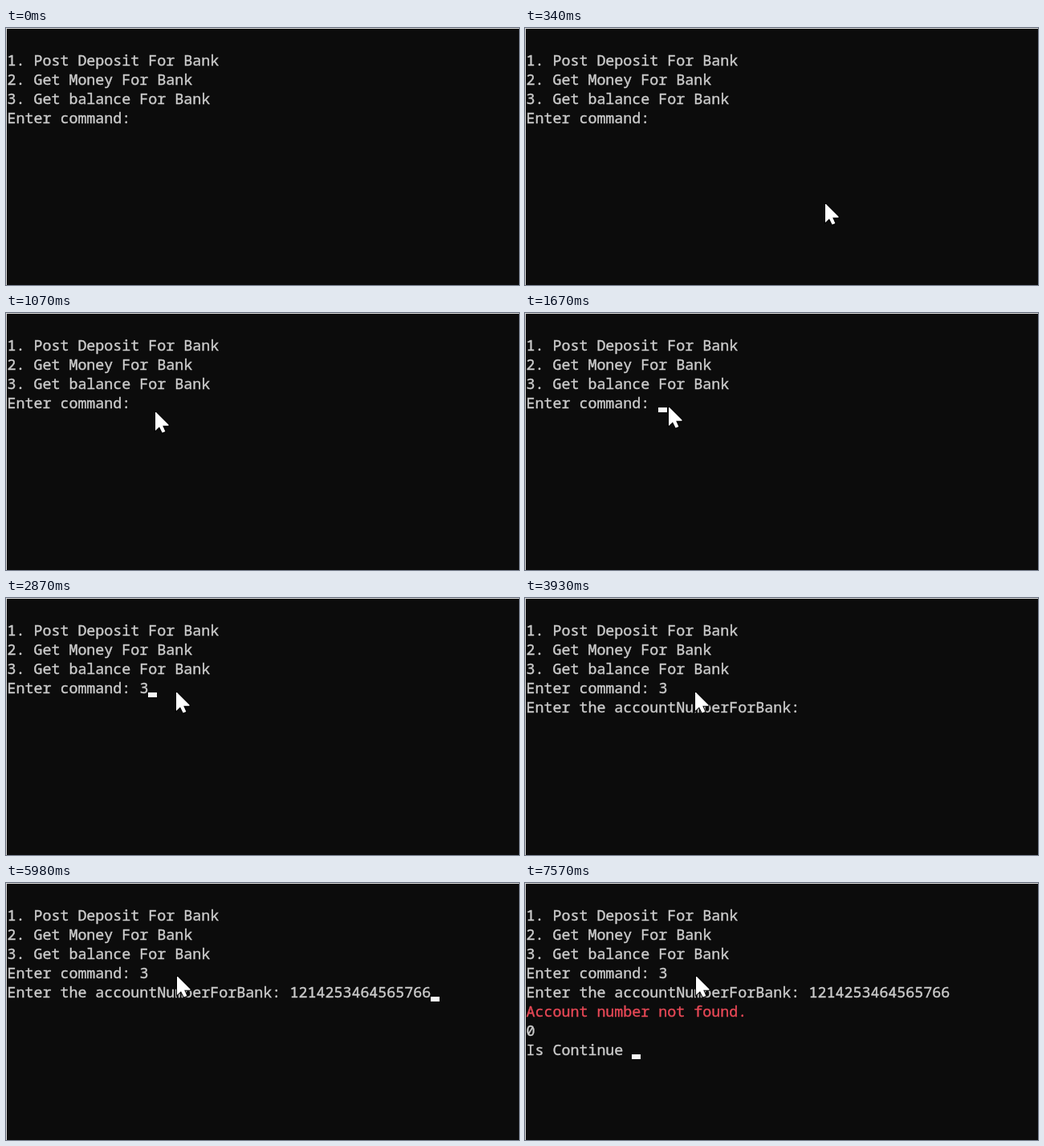
An HTML page with a canvas that plays this animation: 639 px wide and 321 px high, repeating every 8000 ms.

```html
<!DOCTYPE html>
<html lang="en">
<head>
<meta charset="utf-8">
<title>Bank console</title>
<style>
  html, body { margin: 0; width: 100%; height: 100%; overflow: hidden; background: #0c0c0c; }
  canvas { display: block; }
</style>
</head>
<body>
<canvas id="stage" width="639" height="321"></canvas>
<script>
const stage = document.getElementById('stage');
const ctx = stage.getContext('2d');
const LOOP = 8000, TICK = 66.9, BLINK = 530;
const CELL = 11, ROW = 24, LEFT = 1, TOP = 4;
const GREY = '#cccccc', RED = '#e74856';

// Console output; the caret follows the last print, appears at show
// and blinks from hide onwards.
const prints = [
  { at: 0, show: 1270, hide: 1800, text: `
1. Post Deposit For Bank
2. Get Money For Bank
3. Get balance For Bank
Enter command: ` },
  { at: 2200, show: 2200, hide: 2340, text: '3' },
  { at: 2930, show: 3010, hide: 3930, text: '\nEnter the accountNumberForBank: ' },
  { at: 5320, show: 5320, hide: 5450, text: '1214253464565766' },
  { at: 6440, show: 6510, hide: 7040, text: '\nAccount number not found.', colour: RED },
  { at: 6440, show: 6510, hide: 7040, text: '\n0\nIs Continue ' }
];

// Pointer moves, each starting where the one before ended.
const entry = { x: 522, y: 304 };
const moves = [
  { from: 67, to: 672, x: 163, y: 100 },
  { from: 870, to: 1065, x: 186, y: 124 },
  { from: 1205, to: 1605, x: 179, y: 118 },
  { from: 1674, to: 2005, x: 212, y: 118 },
  { from: 5515, to: 5645, x: 213, y: 117 }
];
const click = { from: 740, to: 810, x: 162, y: 98, r: 18 };
const arrow = new Path2D('M0 0H1L16.5 15.5V16.8H9.2L12.4 23.9L8.6 25.6L5 18.3L0 23Z');

const during = (span, t) => t >= span.from && t < span.to;
const smooth = p => p * p * (3 - 2 * p);

function pointerAt(t) {
  const s = Math.floor((t + 4) / TICK) * TICK;
  let { x, y } = entry;
  for (const m of moves) {
    const p = smooth(Math.min(1, Math.max(0, (s - m.from) / (m.to - m.from))));
    x += (m.x - x) * p;
    y += (m.y - y) * p;
  }
  return [Math.round(x), Math.round(y)];
}

function drawPointer(t) {
  if (during(click, t)) {
    ctx.fillStyle = 'rgba(255, 255, 0, 0.5)';
    ctx.beginPath();
    ctx.arc(click.x, click.y, click.r, 0, Math.PI * 2);
    ctx.fill();
  }
  ctx.save();
  ctx.translate(...pointerAt(t));
  ctx.strokeStyle = '#000';
  ctx.lineWidth = 2;
  ctx.stroke(arrow);
  ctx.fillStyle = '#fff';
  ctx.fill(arrow);
  ctx.restore();
}

function drawText(text, x, y, colour) {
  ctx.fillStyle = ctx.strokeStyle = colour;
  ctx.lineWidth = 0.4;
  ctx.fillText(text, x, y);
  ctx.strokeText(text, x, y);
}

function drawConsole(t) {
  ctx.font = '18.333px "Noto Sans Mono", "DejaVu Sans Mono", monospace';
  const shown = prints.filter(p => t >= p.at);
  let row = 0, col = 0;
  for (const { text, colour = GREY } of shown) {
    text.split('\n').forEach((line, i) => {
      if (i) { row++; col = 0; }
      drawText(line, LEFT + col * CELL + 0.4, TOP + row * ROW + 19, colour);
      col += line.length;
    });
  }
  const { show, hide } = shown[shown.length - 1];
  const lit = t < hide || Math.floor((t - hide) / BLINK) % 2 === 1;
  if (t >= show && lit) {
    ctx.fillStyle = '#f8f8f8';
    ctx.fillRect(LEFT + col * CELL, TOP + row * ROW + 18, CELL, 6);
  }
}

function draw(t) {
  ctx.fillStyle = '#0c0c0c';
  ctx.fillRect(0, 0, stage.width, stage.height);
  ctx.fillStyle = '#dcdcdc';
  ctx.fillRect(0, 0, stage.width, 1);
  ctx.fillRect(0, 0, 1, stage.height);
  drawConsole(t);
  if (t >= 70) drawPointer(t);
}

const start = performance.now();
function frame() {
  draw((performance.now() - start) % LOOP);
  requestAnimationFrame(frame);
}
frame();
</script>
</body>
</html>
```
